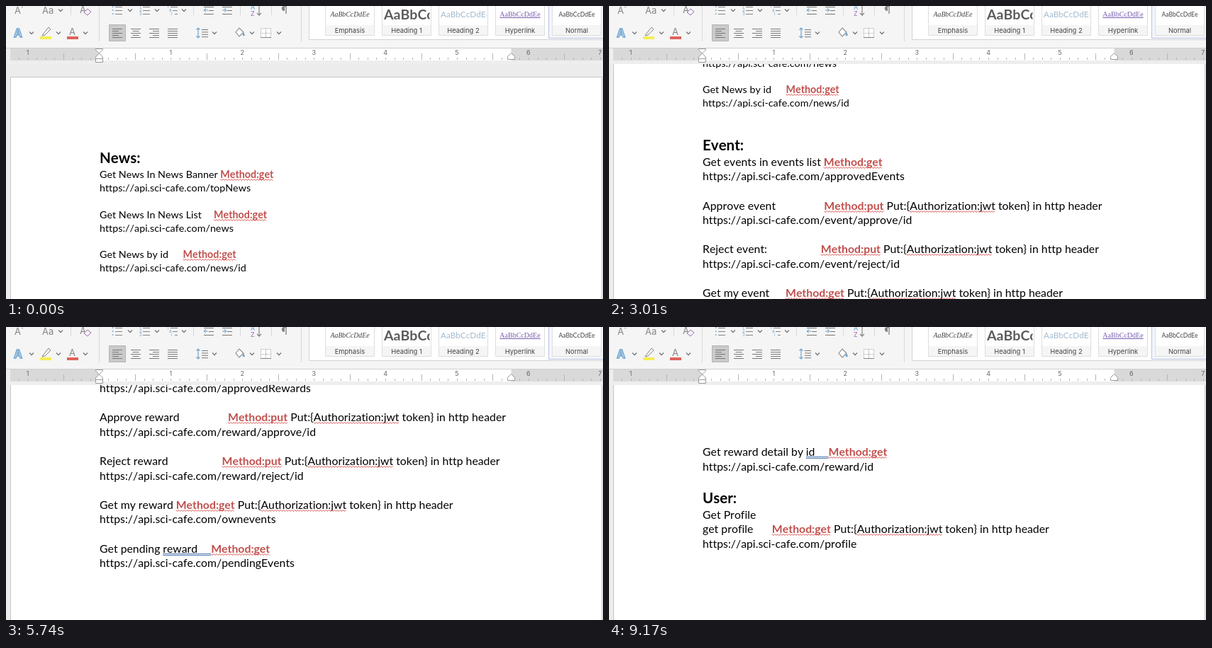
An HTML page with a canvas that plays this animation: 842x414 px, repeating every 9.24 s.

```html
<!DOCTYPE html>
<html lang="en">
<head>
<meta charset="utf-8">
<title>API notes</title>
<style>
html, body { margin: 0; width: 100%; height: 100%; overflow: hidden; background: #ececec; }
canvas { display: block; }
</style>
</head>
<body>
<canvas id="stage" width="842" height="414"></canvas>
<script>
const ctx = document.getElementById('stage').getContext('2d');
const LOOP = 9240, STEP = 70, LEFT = 132, INCH = 100.9;
const PAGE = { top: 100, height: 1180, pitch: 1196 };
const GREY = '#858585', BLUE = '#6ea3cf', SANS = 'px Inter, sans-serif';

// Scroll offset over time: [ms, px], with a rest before the second page
const scrollKeys = [[0, 0], [2240, 147], [3990, 383], [4830, 569], [5740, 803],
  [6300, 862], [6370, 862], [7140, 1092], [8330, 1231], [LOOP, 1231]];

// "#" is a heading, "/" a path on the API host, "_" a word with a grammar mark
const sections = [
  { y: 221.7, size: 14.3, leading: 18.85, body: `# News:
Get News In News Banner Method:get
/topNews

Get News In News List     Method:get
/news

Get News by id      Method:get
/news/id` },
  { y: 437.4, body: `# Event:
Get events in events list Method:get
/approvedEvents

Approve event                  Method:put Put:{Authorization:jwt token} in http header
/event/approve/id

Reject event:                    Method:put Put:{Authorization:jwt token} in http header
/event/reject/id

Get my event      Method:get Put:{Authorization:jwt token} in http header
/ownrewards

Get pending _event     Method:get
/pendingRewards

Get event detail by _id     Method:get
/event/id` },
  { y: 853.2, body: `# Reward:
Get rewards in rewards list Method:get
/approvedRewards

Approve reward                  Method:put Put:{Authorization:jwt token} in http header
/reward/approve/id

Reject reward                    Method:put Put:{Authorization:jwt token} in http header
/reward/reject/id

Get my reward Method:get Put:{Authorization:jwt token} in http header
/ownevents

Get pending _reward     Method:get
/pendingEvents` },
  { y: 1413.4, body: `Get reward detail by _id     Method:get
/reward/id` },
  { y: 1480.4, body: `# User:
Get Profile
get profile       Method:get Put:{Authorization:jwt token} in http header
/profile` }
];

// Monotone cubic through the scroll keys
const slopes = scrollKeys.slice(1).map(([t, y], i) => (y - scrollKeys[i][1]) / (t - scrollKeys[i][0]));
const tangents = scrollKeys.map((_, i) => {
  const a = slopes[i - 1] || 0, b = slopes[i] || 0;
  return a * b > 0 ? 2 * a * b / (a + b) : 0;
});
function scrollAt(t) {
  const i = scrollKeys.findIndex(key => key[0] > t) - 1;
  const [t0, y0] = scrollKeys[i], [t1, y1] = scrollKeys[i + 1];
  const d = t1 - t0, u = (t - t0) / d, v = 1 - u;
  return y0 * (1 + 2 * u) * v * v + y1 * u * u * (3 - 2 * u)
    + d * u * v * (tangents[i] * v - tangents[i + 1] * u);
}

function text(str, x, y, font, color = '#000', align = 'left') {
  ctx.font = font;
  ctx.fillStyle = color;
  ctx.textAlign = align;
  ctx.fillText(str, x, y);
  return x + ctx.measureText(str).width;
}
function rect(x, y, w, h, color) {
  ctx.fillStyle = color;
  ctx.fillRect(x, y, w, h);
}
function path(points, color, width = 1, fill) {
  ctx.beginPath();
  for (let i = 0; i < points.length; i += 2) ctx.lineTo(points[i], points[i + 1]);
  if (fill) {
    ctx.closePath();
    ctx.fillStyle = fill;
    ctx.fill();
  }
  ctx.strokeStyle = color;
  ctx.lineWidth = width;
  ctx.stroke();
}
function box(x, y, w, h, color, fill) {
  path([x, y, x + w, y, x + w, y + h, x, y + h], color, 1, fill);
}
function clipped(x, y, w, h, paint) {
  ctx.save();
  ctx.beginPath();
  ctx.rect(x, y, w, h);
  ctx.clip();
  paint();
  ctx.restore();
}
function squiggle(x0, x1, y) {
  const points = [];
  for (let x = x0, side = 1; x <= x1; x += 2, side = -side) points.push(x, y - side);
  path(points, '#d8504c');
}

function drawLine(line, y, size) {
  const font = size + 'px Lato, sans-serif';
  let x = LEFT;
  for (const part of line.split(/(_\w+ +|Method:\w+|Authorization:jwt)/)) {
    const marked = part[0] === '_', method = part.startsWith('Method');
    const run = marked ? part.slice(1) : part, word = run.trimEnd();
    const end = text(word, x, y, (method ? 'bold ' : '') + font, method ? '#c0504d' : '#000')
      + (run.length - word.length) * 0.24 * size;
    if (marked) [1, 3].forEach(dy => rect(x, y + dy, end - x, 1, '#4f78b0'));
    if (method || part.startsWith('Auth')) squiggle(x, end, y + 2.5);
    x = end;
  }
}

function drawSection({ y, size = 15.8, leading = 20.57, body }) {
  for (const line of body.split('\n')) {
    const baseline = Math.round(y), heading = line[0] === '#';
    if (heading) text(line.slice(2), LEFT, baseline, 'bold 20.5px Lato, sans-serif');
    else drawLine(line.replace(/^\//, 'https://api.sci-cafe.com/'), baseline, size);
    y += heading ? 21.5 : leading;
  }
}

function drawDocument(scroll) {
  rect(0, 78, 842, 336, '#ececec');
  clipped(0, 82, 842, 332, () => {
    ctx.translate(0, -scroll);
    for (let i = 0; i < 2; i++) {
      box(6.5, PAGE.top + i * PAGE.pitch + 0.5, 834, PAGE.height, '#c6c6c6', '#fff');
    }
    sections.forEach(drawSection);
  });
}

// Pentagon with its tip at (x, y), opening up (-1) or down (1)
function marker(x, y, dir, depth) {
  path([x, y, x + 5, y + 5 * dir, x + 5, y + depth * dir, x - 5, y + depth * dir, x - 5, y + 5 * dir],
    '#999', 1, '#fff');
}

function drawRuler() {
  const start = 131.5, end = 712.5;
  rect(0, 59, 842, 23, '#eee');
  rect(6, 60, 836, 17, '#d9d9d9');
  rect(start, 60, end - start, 17, '#fff');
  rect(0, 59, 842, 1, '#cfcfcf');
  for (let i = -9; i <= 56; i++) {
    const x = start + i * INCH / 8, h = Math.abs(i % 8) === 4 ? 9 : 3;
    rect(Math.round(x), 76 - h, 1, h, '#b5b5b5');
    if (i && i % 8 === 0) text(Math.abs(i / 8), x, 69, '9' + SANS, '#666', 'center');
  }
  marker(start, 67, -1, 6.5);
  marker(start, 67, 1, 7.5);
  box(start - 5, 74.5, 10, 5, '#999', '#fff');
  marker(end, 66.5, 1, 9);
}

const chevron = (x, y) => path([x - 3, y - 1.5, x, y + 1.5, x + 3, y - 1.5], '#777', 1.3);

// Five text lines, every other one shorter by "cut" and shifted by "align"
function textLines(x, y, gap, cut, align, count = 5) {
  for (let i = 0; i < count; i++) {
    const short = i % 2 ? cut : 0;
    rect(x + short * align, y + i * gap, 14 - short, 1, '#777');
  }
}

function drawTopRow() {
  text('A', 12, 11, 13 + SANS, GREY);
  text('ˆ', 21, 8, 9 + SANS, GREY);
  text('Aa', 51, 11, 13 + SANS, GREY);
  text('A', 104, 10, 13 + SANS, GREY);
  path([110, 9, 115, 4, 120, 8, 115, 13], '#9a6bb0', 1, '#f5f5f5');
  ['•••', '123', '1ai'].forEach((bullets, list) => {
    const x = 149 + list * 39;
    [...bullets].forEach((bullet, i) => {
      const indent = list === 2 ? i * 3 : 0;
      text(bullet, x + indent, 3 + i * 5, 6 + SANS, BLUE);
      rect(x + 5 + indent, 1 + i * 5, 10 - indent, 1, GREY);
    });
  });
  [-1, 1].forEach((dir, i) => {
    const x = 279 + i * 26, tip = x + 3 + 3 * dir;
    textLines(x, 1, 5, 7, 1, 3);
    path([tip - 6 * dir, 6, tip, 6, tip - 3 * dir, 3.5, tip, 6, tip - 3 * dir, 8.5], BLUE);
  });
  text('A', 345, 5, 9 + SANS, BLUE);
  text('Z', 345, 14, 9 + SANS, '#9a6bb0');
  path([357, 0, 357, 13, 354, 10, 357, 13, 360, 10], GREY, 1.2);
  text('¶', 388, 11, 15 + SANS, GREY);
}

function drawBottomRow() {
  text('A', 11, 44, 'bold 16' + SANS, '#d5e7f5');
  ctx.strokeStyle = BLUE;
  ctx.lineWidth = 1.4;
  ctx.strokeText('A', 11, 44);
  path([52, 40, 60, 30, 63, 33, 55, 41, 51, 42], GREY, 1, '#f5f5f5');
  rect(48, 43, 16, 4, '#f5ee55');
  text('A', 89, 41, 13 + SANS, GREY);
  rect(86, 43, 16, 4, '#e0625a');

  box(145.5, 26.5, 23, 23, '#b5b5b5', '#cacaca');
  for (let i = 0; i < 4; i++) textLines(150 + i * 26, 32, 3, i < 3 ? 5 : 0, i / 2);
  path([271, 31, 271, 45], BLUE, 1.2);
  [1, -1].forEach(dir => path([268.5, 38 - 4.5 * dir, 271, 38 - 7 * dir, 273.5, 38 - 4.5 * dir], BLUE, 1.2));
  for (let i = 0; i < 4; i++) rect(276, 33 + i * 3.4, 9, 1, '#777');
  path([324, 37, 329, 31, 335, 37, 329, 43], GREY, 1.1, '#fff');
  path([335, 38, 336.5, 41.5, 334, 41.5], BLUE, 1, BLUE);
  ctx.setLineDash([1, 1]);
  [359.5, 366.5].forEach(x => box(x, 31.5, 7, 13, '#a5a5a5', '#fff'));
  path([359, 38.5, 374, 38.5], '#a5a5a5');
  ctx.setLineDash([]);
  rect(359, 44, 15, 1, GREY);
}

function drawToolbar() {
  rect(0, 0, 842, 59, '#f5f5f5');
  drawTopRow();
  drawBottomRow();
  [77, 175, 213, 251].forEach(x => chevron(x, 6));
  [36, 74, 112, 294, 347, 385].forEach(x => chevron(x, 38));
  [91, 264, 330, 374].forEach(x => rect(x, 0, 1, 13, '#d8d8d8'));
  [131, 416].forEach(x => rect(x, 0, 1, 50, '#d8d8d8'));
}

function drawStyles() {
  const serif = '"Liberation Serif", serif', sans = 'Lato, sans-serif';
  box(427.5, -1, 420, 48.5, '#d2d2d2', '#fff');
  box(765.5, -1, 80, 46.5, '#b9c3dc', '#f3f5fb');
  [
    ['Emphasis', 'italic 9.8px ' + serif, '#444', 15],
    ['Heading 1', 'bold 19.5px ' + sans, '#5c5c5c', 19],
    ['Heading 2', '11.7px ' + sans, '#a3bace', 16],
    ['Hyperlink', '10px ' + serif, '#7a5fb0', 15],
    ['Normal', '8.6px ' + sans, '#444', 15]
  ].forEach(([name, font, color, y], i) => {
    const left = 450 + i * 80;
    box(left + 0.5, -1, 69, 42.5, '#dedede', '#fff');
    rect(left + 1, 27, 68, 14, '#f5f5f5');
    text(name, left + 35, 38, '9.4' + SANS, '#444', 'center');
    clipped(left, 0, 67.5, 42, () => {
      ctx.font = font;
      const sample = 'AaBbCcDdEe', width = ctx.measureText(sample).width;
      const x = left + Math.max(3, 35 - width / 2);
      text(sample, x, y, font, color);
      if (name === 'Hyperlink') rect(x, y + 1, width, 1, color);
    });
  });
}

// Plain spacing: no kerning pairs, no ligatures
ctx.fontKerning = 'none';
ctx.letterSpacing = '0.01px';

function draw(now) {
  const t = Math.floor(now % LOOP / STEP) * STEP;
  drawDocument(Math.round(scrollAt(t)));
  drawToolbar();
  drawStyles();
  drawRuler();
  requestAnimationFrame(draw);
}
requestAnimationFrame(draw);
</script>
</body>
</html>
```
